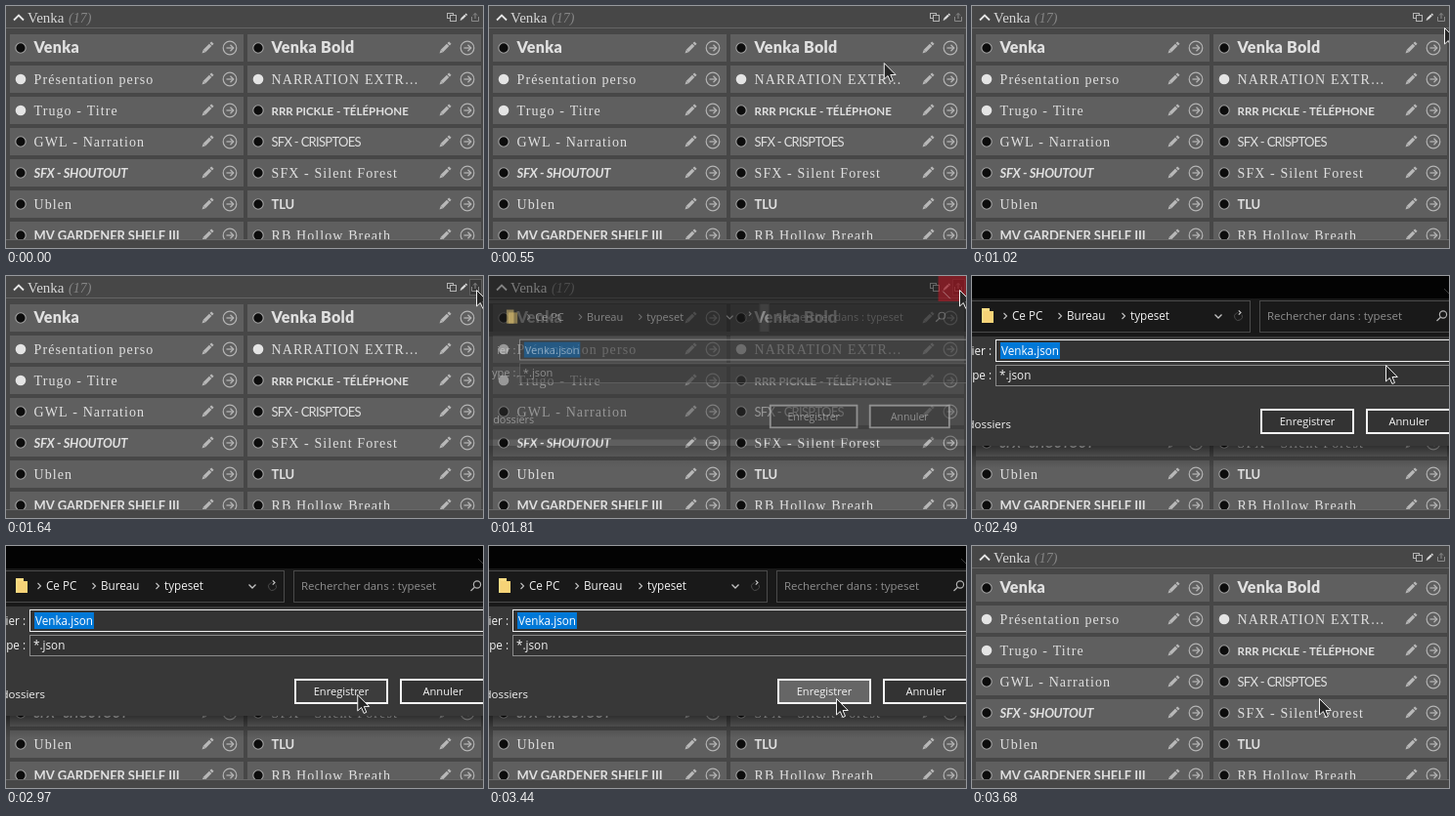
These frames come from a looping animation (488x248 px, 4.52 s). An HTML page with a canvas:

```html
<!DOCTYPE html>
<html lang="fr">
<head>
<meta charset="utf-8">
<title>Export</title>
<style>
html, body { margin: 0; width: 100%; height: 100%; overflow: hidden; background: #474747; }
canvas { display: block; }
</style>
</head>
<body>
<canvas id="stage" width="488" height="248"></canvas>
<script>
const ctx = document.getElementById('stage').getContext('2d');
const LOOP = 4520;
const STEP = 80;
const OPEN = 1810, LEAVE = 2260, PRESS = 3360, CLOSE = 3520;
const sans = size => `${size}px "Open Sans", "Noto Sans", sans-serif`;
const serif = size => `${size}px "Liberation Serif", serif`;
const UI = sans(11.7);

// font and letter spacing of each label style
const STYLES = {
  serif: [serif(14), 1.1],
  brush: ['900 16px Lato, sans-serif', 0.3],
  small: ['bold 11.5px Lato, sans-serif', 0],
  thin: ['13px Lato, sans-serif', -0.7],
  slant: ['italic bold 13px Lato, sans-serif', -0.3],
  block: ['bold 13px Lato, sans-serif', -0.1]
};

// label, style, light dot
const ITEMS = [
  ['Venka', 'brush'], ['Venka Bold', 'brush'],
  ['Présentation perso', 'serif', true], ['NARRATION EXTR…', 'serif', true],
  ['Trugo - Titre', 'serif', true], ['RRR PICKLE - TÉLÉPHONE', 'small'],
  ['GWL - Narration', 'serif'], ['SFX - CRISPTOES', 'thin'],
  ['SFX - SHOUTOUT', 'slant'], ['SFX - Silent Forest', 'serif'],
  ['Ublen', 'serif'], ['TLU', 'block'],
  ['MV GARDENER SHELF III', 'block'], ['RB Hollow Breath', 'serif']
];

// pointer path: time, x, y
const PATH = [
  [230, 3, 122], [710, 455, 50], [1020, 484, 22], [1340, 482, 14],
  [LEAVE - STEP, 482, 14], [2490, 424, 91], [3130, 356, 156]
];

const clamp = v => Math.max(0, Math.min(1, v));
const easeOut = k => 1 - (1 - k) ** 2;
const stepsSince = (t, start) => Math.floor((t - start + 10) / STEP) + 1;

function pointerAt(t) {
  const i = PATH.findLastIndex(p => p[0] <= t);
  if (i < 0) return null;
  const [t0, x0, y0] = PATH[i];
  const [t1, x1, y1] = PATH[i + 1] || [LOOP, x0, y0];
  const snapped = Math.floor((t - t0) / STEP) * STEP;
  const k = easeOut(snapped / (t1 - t0));
  return [x0 + (x1 - x0) * k, y0 + (y1 - y0) * k];
}

function dialogAlpha(t) {
  if (t < OPEN) return 0;
  if (t < CLOSE) return easeOut(clamp(stepsSince(t, OPEN) / 4));
  return 1 - clamp(stepsSince(t, CLOSE) / 3);
}

function box(x, y, w, h, fill) {
  ctx.fillStyle = fill;
  ctx.fillRect(x, y, w, h);
}

function frame(x, y, w, h, color, line = 1) {
  ctx.strokeStyle = color;
  ctx.lineWidth = line;
  ctx.strokeRect(x + line / 2, y + line / 2, w - line, h - line);
}

function panel(x, y, w, h, fill, border, line) {
  box(x, y, w, h, fill);
  frame(x, y, w, h, border, line);
}

function path(points, color, line = 1) {
  ctx.strokeStyle = color;
  ctx.lineWidth = line;
  ctx.beginPath();
  points.forEach(([x, y]) => ctx.lineTo(x, y));
  ctx.stroke();
}

// open arrowhead whose tip points along the angle
function caret(x, y, size, angle, color, line) {
  ctx.save();
  ctx.translate(x, y);
  ctx.rotate(angle);
  path([[-size, -size], [0, 0], [-size, size]], color, line);
  ctx.restore();
}

function disc(x, y, r, fill, stroke, line = 1) {
  ctx.beginPath();
  ctx.arc(x, y, r, 0, Math.PI * 2);
  if (fill) { ctx.fillStyle = fill; ctx.fill(); }
  if (stroke) { ctx.strokeStyle = stroke; ctx.lineWidth = line; ctx.stroke(); }
}

function text(str, x, y, font, color, spacing = 0, align = 'left') {
  ctx.font = font;
  ctx.letterSpacing = spacing + 'px';
  ctx.textAlign = align;
  ctx.fillStyle = color;
  ctx.fillText(str, x, y);
}

function pencil(x, y, size, color) {
  ctx.save();
  ctx.translate(x, y);
  ctx.rotate(Math.PI / 4);
  ctx.scale(size / 12, size / 12);
  box(-1.7, -7.6, 3.4, 2.4, color);
  box(-1.7, -4.4, 3.4, 8.6, color);
  ctx.beginPath();
  ctx.moveTo(-1.7, 4.2);
  ctx.lineTo(1.7, 4.2);
  ctx.lineTo(0, 7.8);
  ctx.fill();
  ctx.restore();
}

function goIcon(x, y) {
  const color = '#b4b4b4';
  disc(x, y, 6.8, null, color, 1.2);
  path([[x - 3.5, y], [x + 3.5, y]], color, 1.3);
  caret(x + 3.7, y, 3.2, 0, color, 1.3);
}

function drawRow([label, style, light], i) {
  const x = i % 2 ? 247 : 4;
  const y = 29 + 32 * Math.floor(i / 2);
  const mid = y + 14;
  const [font, spacing] = STYLES[style];
  box(x, y, 239, 28, '#5f5f5f');
  if (light) disc(x + 11, mid, 5.3, '#e4e4e4');
  else disc(x + 11, mid, 5.2, '#0c0c0c', '#a2a2a2', 1.1);
  text(label, x + 24.5, mid + 5, font, '#e0e0e0', spacing);
  pencil(x + 202, mid, 12, '#b8b8b8');
  goIcon(x + 225, mid);
}

function drawHeader(hover) {
  caret(13, 9.5, 5, -Math.PI / 2, '#e6e6e6', 1.8);
  text('Venka', 22, 17, serif(15), '#d6d6d6');
  text('(17)', 64, 17, 'italic ' + serif(14), '#858585');
  box(0, 22, 488, 1, '#646464');
  ctx.globalAlpha = hover;
  panel(474, 3, 13, 17, '#383838', '#5e5e5e');
  ctx.globalAlpha = 1;
  frame(451, 7, 7, 6, '#b4b4b4');
  panel(454, 9, 7, 7, '#474747', '#b4b4b4');
  pencil(468, 11.5, 7.5, '#dddddd');
  const dim = '#8a8a8a';
  path([[476.5, 11], [476.5, 15.5], [483.5, 15.5], [483.5, 11]], dim);
  path([[480, 13], [480, 7.5]], dim);
  caret(480, 7.5, 2, -Math.PI / 2, dim, 1);
}

function drawList(hover) {
  box(0, 0, 488, 248, '#474747');
  drawHeader(hover);
  ctx.save();
  ctx.beginPath();
  ctx.rect(0, 24, 488, 215);
  ctx.clip();
  ITEMS.forEach(drawRow);
  ctx.restore();
  box(0, 239, 488, 1, '#686868');
}

function drawAddress() {
  const soft = '#c4c4c4', field = '#191919', edge = '#4a4a4a';
  panel(-40, 25, 325, 33, field, edge);
  box(10, 33, 8, 15, '#fbdc83');
  box(12, 36, 10, 12, '#f6d377');
  let x = 41;
  for (const name of ['Ce PC', 'Bureau', 'typeset']) {
    caret(x - 5.5, 41, 3, 0, soft, 1.1);
    text(name, x, 45, UI, '#f2f2f2');
    x += Math.round(ctx.measureText(name).width) + 25;
  }
  caret(252, 43, 3.5, Math.PI / 2, soft, 1.3);
  ctx.beginPath();
  ctx.arc(272.5, 41.5, 4, -0.5, 4.6);
  ctx.stroke();
  caret(275, 37.5, 2.2, 0, soft, 1.2);

  panel(294, 25, 220, 33, field, edge);
  text('Rechercher dans : typeset', 302, 45, sans(11.5), '#8f8f8f');
  disc(482, 39.5, 3.6, null, '#b0b0b0', 1.2);
  path([[479.4, 42.3], [475.5, 46]], '#b0b0b0', 1.3);
}

function drawButton(label, x, w, fill) {
  panel(x, 136, w, 26, fill, '#f4f4f4', 2);
  text(label, x + w / 2, 153, sans(11.1), '#f5f5f5', 0, 'center');
}

function saveFill(t) {
  const v = t >= PRESS ? 102 : 51 + 18 * clamp((t - 2730) / 480);
  return `rgb(${v},${v},${v})`;
}

function drawFields() {
  const white = '#f2f2f2';
  text('ier :', 20, 81, UI, white, 0, 'right');
  text('ype :', 20, 106, UI, white, 0, 'right');
  panel(24, 65, 500, 23, '#333333', '#f0f0f0');
  ctx.textAlign = 'left';
  box(29, 68, ctx.measureText('Venka.json').width + 2, 17, '#0078d7');
  text('Venka.json', 30, 81, UI, '#ffffff');
  panel(24, 91, 500, 22, '#333333', '#8c8c8c');
  text('*.json', 28, 106, UI, white);
  text('dossiers', 40, 156, sans(11.5), white, 0, 'right');
}

function drawDialog(t, alpha) {
  const onClose = t < LEAVE;
  const scale = 0.9 + 0.1 * alpha;
  ctx.save();
  ctx.globalAlpha = alpha;
  const shade = ctx.createLinearGradient(0, 174, 0, 197);
  shade.addColorStop(0, 'rgba(0,0,0,.5)');
  shade.addColorStop(0.5, 'rgba(0,0,0,.18)');
  shade.addColorStop(1, 'rgba(0,0,0,0)');
  box(0, 174, 488, 23, shade);

  ctx.translate(150, 60);
  ctx.scale(scale, scale);
  ctx.translate(-150, -60);
  box(-40, -10, 600, 33, '#030303');
  box(-40, 23, 600, 39, '#191919');
  box(-40, 62, 600, 112, '#383838');
  if (onClose) box(478, -10, 80, 34, '#e81123');
  path([[483, 13], [491, 21]], onClose ? '#ffffff' : '#3c3c3c');
  drawAddress();
  drawFields();
  drawButton('Enregistrer', 295, 96, saveFill(t));
  drawButton('Annuler', 403, 88, '#333333');
  ctx.restore();
}

function drawPointer(x, y) {
  const shape = [[0, 0], [0, 16.5], [3.8, 13], [6.4, 19], [9, 17.9], [6.5, 12], [11.8, 12]];
  ctx.save();
  ctx.translate(x - 0.5, y + 0.5);
  ctx.beginPath();
  shape.forEach(([px, py]) => ctx.lineTo(px, py));
  ctx.closePath();
  ctx.fillStyle = '#262626';
  ctx.fill();
  ctx.strokeStyle = '#f0f0f0';
  ctx.lineWidth = 1;
  ctx.stroke();
  ctx.restore();
}

function render(t) {
  const hover = t < 1570 || t >= CLOSE ? 0 : clamp(stepsSince(t, 1570) / 2);
  drawList(hover);
  const alpha = dialogAlpha(t);
  if (alpha > 0) drawDialog(t, alpha);
  const at = pointerAt(t);
  if (at) drawPointer(...at);
}

const start = performance.now();
function tick() {
  render((performance.now() - start) % LOOP);
  requestAnimationFrame(tick);
}
tick();
</script>
</body>
</html>
```
